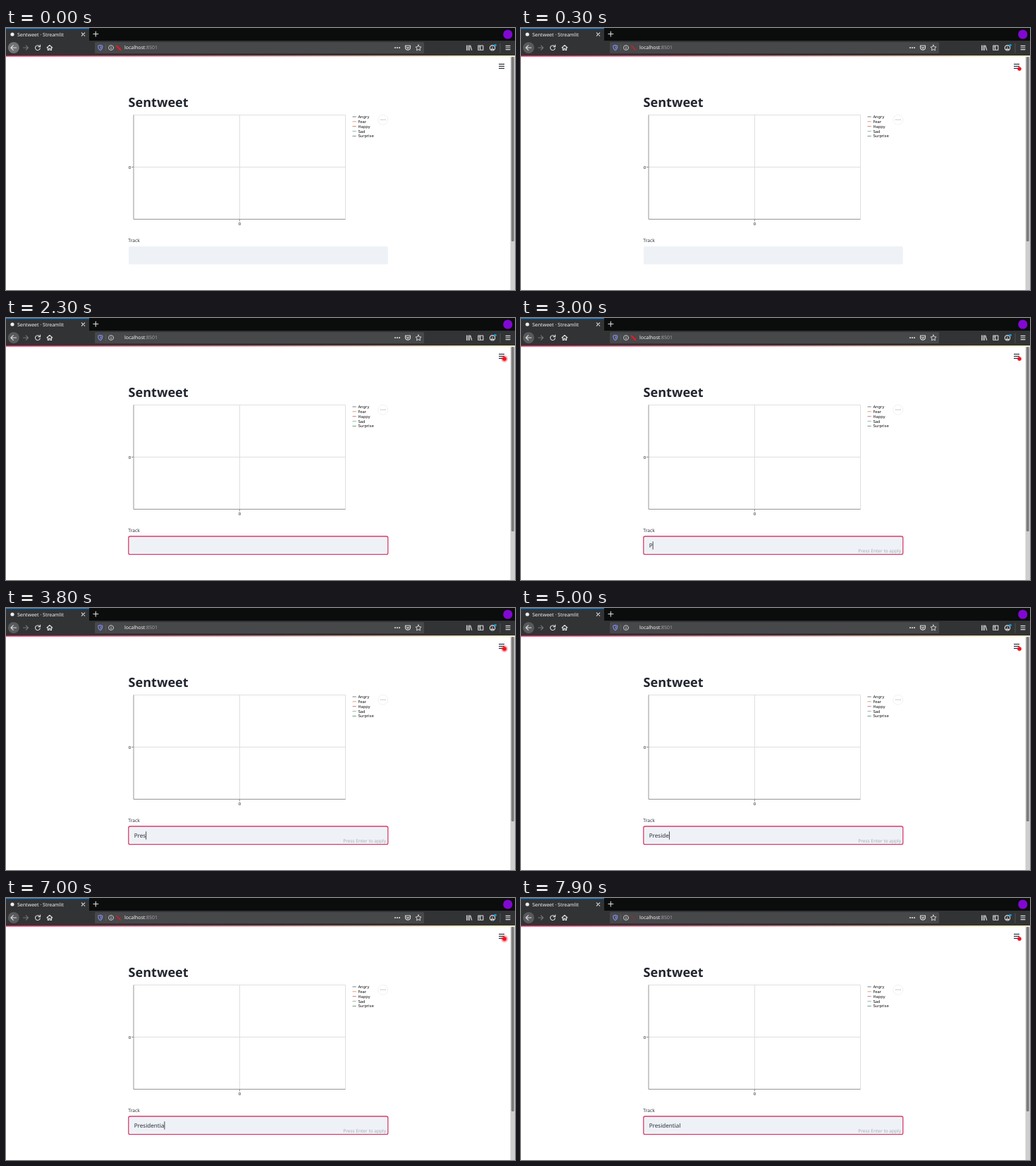
Recreate the animation shown at these times as an HTML page. Size 722 by 372 pixels, loop 8 s.

```html
<!DOCTYPE html>
<html lang="en">
<head>
<meta charset="utf-8">
<title>Sentweet</title>
<style>
  html, body { margin: 0; width: 100%; height: 100%; overflow: hidden; background: #fff; }
  svg { display: block; width: 722px; height: 372px; font-family: "Noto Sans", sans-serif; text-rendering: geometricPrecision; }
  .chart { font: 5.4px "DejaVu Sans", sans-serif; fill: #111; }
  .icon { fill: none; stroke: #dededf; stroke-width: 1.1; stroke-linecap: round; stroke-linejoin: round; }
</style>
</head>
<body>
<svg viewBox="0 0 722 372">
  <defs>
    <linearGradient id="rainbow">
      <stop offset="0" stop-color="#d8295c"/>
      <stop offset=".5" stop-color="#e9888f"/>
      <stop offset="1" stop-color="#f3edb0"/>
    </linearGradient>
    <radialGradient id="halo">
      <stop offset=".3" stop-color="#ff1f2d" stop-opacity=".75"/>
      <stop offset="1" stop-color="#ff1f2d" stop-opacity="0"/>
    </radialGradient>
  </defs>

  <!-- Tab strip -->
  <rect width="722" height="18" fill="#0b0c0c"/>
  <rect width="118" height="18" fill="#323335"/>
  <rect width="118" height="1.2" fill="#1583dc"/>
  <circle cx="9" cy="9" r="2.6" fill="#eee"/>
  <text x="16" y="11.8" font-size="7" fill="#f4f4f5">Sentweet · Streamlit</text>
  <path class="icon" d="M107.3 6.8l4.4 4.4m0-4.4l-4.4 4.4M123.8 8.5h7m-3.5-3.5v7"/>
  <circle cx="711.8" cy="9" r="6.6" fill="#8108d3"/>

  <!-- Toolbar -->
  <rect y="18" width="722" height="21.5" fill="#323335"/>
  <rect x="126" y="20" width="467" height="16" rx="1.5" fill="#474849"/>
  <circle id="back" cx="10.8" cy="28" r="8"/>
  <g class="icon">
    <path d="M14.5 28h-7.4m3.2-3.3l-3.3 3.3 3.3 3.3"/>
    <path d="M24.5 28h7m-3.2-3.2l3.2 3.2-3.2 3.2" stroke="#747577"/>
    <path d="M47.6 26a3.4 3.4 0 1 0 .7 2.7M48.6 24v2.7h-2.8"/>
    <path d="M58 28l3.9-3.7 3.9 3.7M59.3 27.5v4h1.6v-2.4h2v2.4h1.6v-4"/>
    <path d="M133.8 24.4l3 .9c.1 3.2-.7 5.2-3 6.5-2.3-1.3-3.1-3.3-3-6.5z" stroke="#7f8fee"/>
    <path d="M133.8 26v4.2c1-.9 1.5-2 1.5-3.7z" fill="#7f8fee" stroke="none"/>
    <path d="M141.5 23.5v9M701 22v13" stroke="#606163" stroke-width=".7"/>
    <circle cx="149" cy="28" r="3.5" stroke-width=".8"/>
    <path d="M149 27.8v2.1m0-3.8v.1" stroke-width=".9"/>
    <path d="M552 28h.1m2.9 0h.1m2.9 0h.1" stroke-width="2"/>
    <path d="M566.5 25h7v2.6a3.5 3.5 0 0 1-7 0zm1.8 2.1l1.7 1.7 1.7-1.7"/>
    <path d="M585 24l1.2 2.6 2.8.4-2 2 .5 2.8-2.5-1.3-2.5 1.3.5-2.8-2-2 2.8-.4z" stroke-width=".9"/>
    <path d="M653.5 24.7v6.8m2-6.8v6.8m2-6.8v6.8m1.2-6.5l2 6.3"/>
    <path d="M669.8 25h7v6.2h-7zm3 0v6.2m-1.5-4.6v.1m0 1.5v.1"/>
    <circle cx="690" cy="28.3" r="3.7"/>
    <path d="M688.2 30.5q1.8-1.7 3.6 0M690 27.2v.2" stroke-width="1.4"/>
    <path d="M709 25.4h6m-6 2.6h6m-6 2.6h6"/>
  </g>
  <circle cx="694" cy="24.5" r="1.8" fill="#1699d8"/>
  <g id="share">
    <path d="M156.3 25.2h4.5v4h-4.5zM159 28.1h4.3v3.8H159z" fill="#a82431"/>
    <path d="M155.8 24.5l7.4 7.4" stroke="#e23844"/>
  </g>
  <text x="168" y="30.4" font-size="6.93" fill="#f4f4f5">localhost<tspan fill="#a0a1a3">:8501</tspan></text>

  <!-- Page -->
  <rect y="39" width="722" height="1.6" fill="url(#rainbow)"/>
  <rect x="715.5" y="40.6" width="6.5" height="332" fill="#cecece"/>
  <rect x="716.8" y="41" width="3.9" height="262" rx="1.5" fill="#7c7c7c"/>
  <path d="M699 51.4h8m-8 3h8m-8 3h8" stroke="#333740" stroke-width="1.2"/>
  <g id="dot">
    <circle id="glow" cx="707" cy="58" fill="url(#halo)"/>
    <circle cx="707" cy="58" r="2.7" fill="#f5101f"/>
  </g>
  <text x="173.5" y="112" font-size="18.1" font-weight="700" fill="#20242d">Sentweet</text>

  <g fill="none" stroke="#dcdcdc" stroke-width=".9">
    <path d="M181 123.5h300.5v148M331.5 123.5v148M181 197.5h300.5"/>
    <path d="M181 123.5v148h300.5M178 197.5h3M331.5 271.5v3" stroke="#8b8b8b"/>
  </g>
  <g class="chart">
    <text x="177.3" y="199.5" text-anchor="end">0</text>
    <text x="331.5" y="279.8" text-anchor="middle">0</text>
    <g id="legend"></g>
  </g>
  <circle cx="534.8" cy="130.3" r="7" fill="none" stroke="#eee" stroke-width=".8"/>
  <path d="M532 130.3h.1m2.7 0h.1m2.7 0h.1" stroke="#aaa" stroke-width="1.4" stroke-linecap="round"/>

  <text x="173.3" y="303.8" font-size="6.7" fill="#31343d">Track</text>
  <rect id="field" x="173.8" y="310" width="368" height="25.6" rx="2.2" fill="#eef2f7" stroke-width="1.3"/>
  <text id="hint" x="539" y="333.4" font-size="6.5" text-anchor="end" fill="#a7abb4">Press Enter to apply</text>
  <text id="typed" x="181.7" y="325.8" font-size="8.1" fill="#292d36"></text>
  <rect id="caret" y="317.3" width=".8" height="11.4" fill="#222"/>
</svg>
<script>
  const LOOP = 8000, PULSE = 1500, FOCUS = 800, BLINK = 500;
  const WORD = "Presidential";
  const KEY_TIMES = [2800, 3100, 3400, 3800, 4200, 4600, 5000, 5400, 5700, 6100, 6600, 7200];
  const $ = id => document.getElementById(id);
  const show = (id, on) => $(id).setAttribute("visibility", on ? "visible" : "hidden");

  const moods = { Angry: "#6f8096", Fear: "#e79a66", Happy: "#d77870", Sad: "#91b5b2", Surprise: "#76977a" };
  $("legend").innerHTML = Object.entries(moods).map(([name, color], i) => {
    const y = 126 + i * 6.87;
    return `<path d="M491.5 ${y}h5.2" stroke="${color}"/><text x="499.4" y="${y + 2}">${name}</text>`;
  }).join("");

  function draw(t) {
    const phase = t % PULSE;
    const keys = KEY_TIMES.filter(k => k <= t);
    const lastInput = keys.length ? keys[keys.length - 1] : FOCUS;
    const focused = t >= FOCUS;

    // The sharing icon fades out and back once per pulse
    const away = Math.min(1, Math.max(0, (Math.abs(phase - 650) - 150) / 350));
    $("share").setAttribute("opacity", away * away * (3 - 2 * away));
    $("back").setAttribute("fill", t < 100 ? "#727375" : "#595a5c");

    show("dot", t >= 200);
    const glow = (1 - Math.cos(2 * Math.PI * (phase - 200) / PULSE)) / 2;
    $("glow").setAttribute("r", 2.7 + 3.3 * glow);

    $("field").setAttribute("stroke", focused ? "#d93d69" : "none");
    show("hint", keys.length > 0);
    const typed = $("typed");
    typed.textContent = WORD.slice(0, keys.length);
    $("caret").setAttribute("x", 181.8 + (keys.length ? typed.getComputedTextLength() : 0));
    show("caret", focused && Math.floor((t - lastInput) / BLINK) % 2 === 0);
  }

  const start = performance.now();
  function tick() {
    draw((performance.now() - start) % LOOP);
    requestAnimationFrame(tick);
  }
  tick();
</script>
</body>
</html>
```
